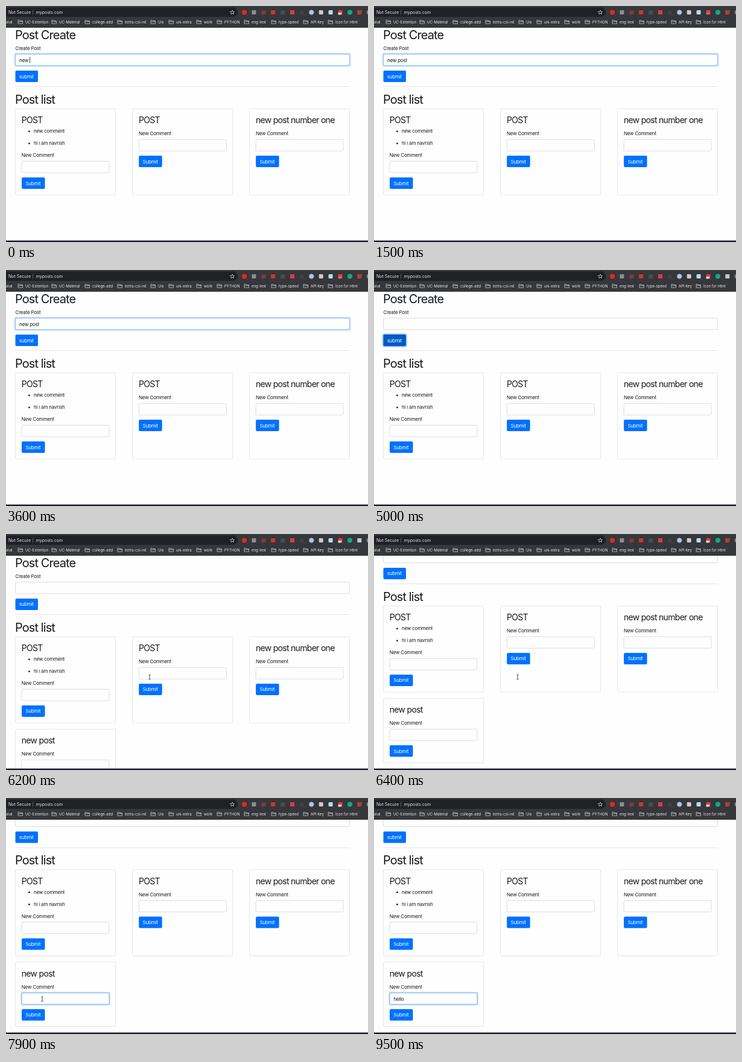
These frames come from a looping animation (600 px wide and 391 px high, 10000 ms). An HTML page:

```html
<!DOCTYPE html>
<html lang="en">
<head>
<meta charset="utf-8">
<title>Post Create</title>
<style>
  html, body { margin: 0; width: 100%; height: 100%; overflow: hidden; background: #fefefe; }
  svg { display: block; width: 600px; height: 391px; }
  text { font: 8px Inter, sans-serif; letter-spacing: -.025em; fill: #16181b; white-space: pre; }
  .h1 { font-size: 20px; letter-spacing: -.046em; }
  .h3 { font-size: 14px; letter-spacing: -.05em; }
  .url { font-size: 7px; letter-spacing: 0; fill: #e8eaed; }
  .mark { font-size: 6px; letter-spacing: 0; fill: #e8eaed; }
  .white { fill: #fff; }
  .card { fill: #fefefe; stroke: #dcdcdd; stroke-width: .7; }
  .field { fill: #fefefe; stroke: #c9cfd5; stroke-width: .7; }
  .button { fill: #0071fd; }
  .ring { fill: none; stroke: #abd2ff; stroke-width: 1.8; }
  .line { fill: none; stroke: #c8cacd; stroke-width: .8; }
  .caret { fill: #111; }
</style>
</head>
<body>
<svg viewBox="0 0 600 391">
  <g id="page"></g>
  <g id="browser"></g>
  <g id="pointer">
    <path id="arrow" d="M0 0V7.2L1.7 5.7 2.8 8.2 4 7.7 2.9 5.2H5.2Z" fill="#000" stroke="#fff" stroke-width=".5"/>
    <path id="hand" d="M1.5 4.8V1a.8.8 0 0 1 1.6 0V3.2L6 3.8a1 1 0 0 1 .8 1V7L6 9H2.6L.2 5.8A.7.7 0 0 1 1.5 4.8Z" fill="#000" stroke="#fff" stroke-width=".6"/>
    <path id="beam" d="M-1.7-4Q0-4 0-3V3Q0 4-1.7 4M1.7-4Q0-4 0-3M0 3Q0 4 1.7 4" fill="none" stroke="#222" stroke-width=".8"/>
  </g>
</svg>
<script>
const $ = id => document.getElementById(id);
const show = (id, on) => $(id).style.display = on ? '' : 'none';

const text = (x, y, s, cls = '') => `<text x="${x}" y="${y}" class="${cls}">${s}</text>`;
const box = (x, y, w, h, attrs) => `<rect x="${x}" y="${y}" width="${w}" height="${h}" ${attrs}/>`;

const field = (x, y, w, id) =>
  box(x, y, w, 19, 'rx="2" class="field"') + (id ? `
  <g id="${id}Ring">${box(x - .6, y - .6, w + 1.2, 20.2, 'rx="2.6" class="ring"')}
  ${box(x, y, w, 19, 'rx="2" fill="none" stroke="#80bdff" stroke-width=".7"')}</g>
  <text id="${id}" x="${x + 6.5}" y="${y + 12.7}"></text>
  ${box(0, y + 4.6, .8, 9.6, `id="${id}Caret" class="caret"`)}` : '');

const button = (x, y, w, label, id = '') =>
  box(x, y, w, 19, `rx="2" class="button" id="${id}"`) + text(x + 6.3, y + 12.5, label, 'white');

function card(x, y, h, title, comments = [], id) {
  const rows = comments.map((c, i) =>
    `<circle cx="${x + 23}" cy="${y + 37.5 + i * 20}" r="1.3"/>` + text(x + 30.5, y + 40 + i * 20, c));
  const top = y + (comments.length ? 80 : 44);
  return box(x, y, 166, h, 'rx="2" class="card"') + text(x + 10.3, y + 24, title, 'h3') + rows.join('') +
    text(x + 10.3, top, 'New Comment') + field(x + 10.5, top + 7, 145, id) +
    button(x + 10.5, top + 33.8, 38.5, 'Submit');
}

$('page').innerHTML =
  text(15, 55.3, 'Post Create', 'h1') + text(15.5, 72.6, 'Create Post') +
  field(15.5, 79.8, 554, 'post') +
  `<g id="submitRing">${box(14.7, 106.2, 39.1, 20.6, 'rx="2.8" class="ring" style="stroke:#8cc2ff"')}</g>` +
  button(15.5, 107, 37.5, 'submit', 'submit') +
  box(15.5, 133.3, 553.5, .7, 'fill="#dedede"') +
  text(15, 161.6, 'Post list', 'h1') +
  card(15.5, 170.2, 142.8, 'POST', ['new comment', 'hi i am navrish']) +
  card(209.7, 170.2, 142.8, 'POST') +
  card(403.6, 170.2, 142.8, 'new post number one') +
  `<g id="newCard">${card(15.5, 323.3, 106.7, 'new post', [], 'comment')}</g>`;

const bookmarks = [
  [20, 'UC-Extention'], [76, 'UC-Material'], [131, 'college-add'], [185, 'extra-col-rel'],
  [240, 'Uni'], [270, 'uni-extra'], [316, 'work'], [350, 'PYTHON'], [395, 'eng-test'],
  [440, 'type-speed'], [493, 'API Key'], [534, 'Icon for Html']];
const folder = x => `<path class="line" d="M${x} 23.6h2.8l1 1.1h3.7v4.6h-7.5zM${x} 25.8h7.5"/>`;

const extensions = ['#dd2a20', '#8b8d90', '#7b3b3e', '#d5302a', '#4b4d50', '#d63b4c', '#3e4043',
  '#a9c6e4', '#c9cbcd', '#b5daf3', '#dc433e', '#12a882', '#bd3c37', '#85878a'];
const round = [0, 7, 11, 13];
const extension = (color, i) => {
  const x = 395 + i * 15.9;
  return round.includes(i) ? `<circle cx="${x}" cy="10.5" r="4" fill="${color}"/>`
    : box(x - 3.5, 7, 7, 7, `rx="1" fill="${color}" id="ext${i}"`);
};

$('browser').innerHTML =
  box(0, 0, 600, 36, 'fill="#36373a"') +
  box(-20, 2.5, 404, 15.5, 'rx="7.7" fill="#202124"') +
  text(4, 13, 'Not Secure', 'url') + box(44.2, 6.5, .7, 8, 'fill="#77797d"') + text(49.7, 13, 'myposts.com', 'url') +
  '<path class="line" d="M375 7l1 2.3 2.5.2-1.9 1.7.6 2.4-2.2-1.3-2.2 1.3.6-2.4-1.9-1.7 2.5-.2z"/>' +
  extensions.map(extension).join('') +
  box(550.5, 11, 5.5, 3.5, 'rx=".8" fill="#fff" id="pulse"') +
  text(-1.5, 28.6, 'onal', 'mark') +
  bookmarks.map(([x, s]) => folder(x) + text(x + 12, 28.6, s, 'mark')).join('') +
  box(0, 388.6, 600, 3, 'fill="#171923"');

// Piecewise motion with smooth ends; each stop is [time, ...values].
function track(t, stops) {
  let i = stops.findIndex(s => s[0] > t);
  if (i < 0) return stops[stops.length - 1].slice(1);
  if (!i) return stops[0].slice(1);
  const a = stops[i - 1], b = stops[i];
  const p = (t - a[0]) / (b[0] - a[0]), k = p * p * (3 - 2 * p);
  return a.slice(1).map((v, j) => v + (b[j + 1] - v) * k);
}

const typed = (s, start, times, t) => s.slice(0, start + times.filter(k => t >= k).length);

function setField(id, value, focused, caretOn) {
  $(id).textContent = value;
  show(id + 'Ring', focused);
  show(id + 'Caret', focused && caretOn);
  const end = value ? $(id).getComputedTextLength() : 0;
  $(id + 'Caret').setAttribute('x', +$(id).getAttribute('x') + end);
}

const scrollStops = [[6200, 0], [6400, 51], [6600, 52], [6850, 52], [7100, 51.4]];
const pointerStops = [
  [2300, -4, 112], [2700, 18, 115], [3300, 18, 115], [3600, -4, 118],
  [3601, 270, 205], [5900, 270, 205], [6100, 238, 237], [6450, 238, 237],
  [6800, 114.5, 266], [7000, 104, 292], [7300, 60, 333]];
const within = (t, a, b) => t >= a && t < b;

function draw(t) {
  $('page').setAttribute('transform', `translate(0 ${-track(t, scrollStops)[0]})`);

  const post = t < 4800 ? typed('new post', 4, [100, 400, 600, 900], t) : '';
  setField('post', post, t < 3800, t < 900 || (t - 900) % 1000 < 500);
  show('submitRing', within(t, 3800, 5200));
  $('submit').style.fill = within(t, 4800, 5200) ? '#005bc4' : '';

  show('newCard', t >= 5200);
  const comment = typed('hello', 0, [8100, 8300, 8500, 8700, 9000], t);
  setField('comment', comment, t >= 7400, t < 7900 || within(t, 8100, 9500));

  $('ext12').style.fill = within(t, 4800, 6300) ? '#c4c6c9' : '';
  $('pulse').style.opacity = t < 4900 ? .45 + .3 * Math.cos(t * Math.PI / 500) : .75;

  const [x, y] = track(t, pointerStops);
  show('pointer', within(t, 2300, 3600) || within(t, 5900, 8100));
  $('pointer').setAttribute('transform', `translate(${x} ${y})`);
  const hand = within(t, 2500, 3450), beam = within(t, 5900, 6500) || t >= 7200;
  show('hand', hand);
  show('beam', beam);
  show('arrow', !hand && !beam);
}

function loop() {
  draw(performance.now() % 10000);
  requestAnimationFrame(loop);
}
loop();
</script>
</body>
</html>
```
